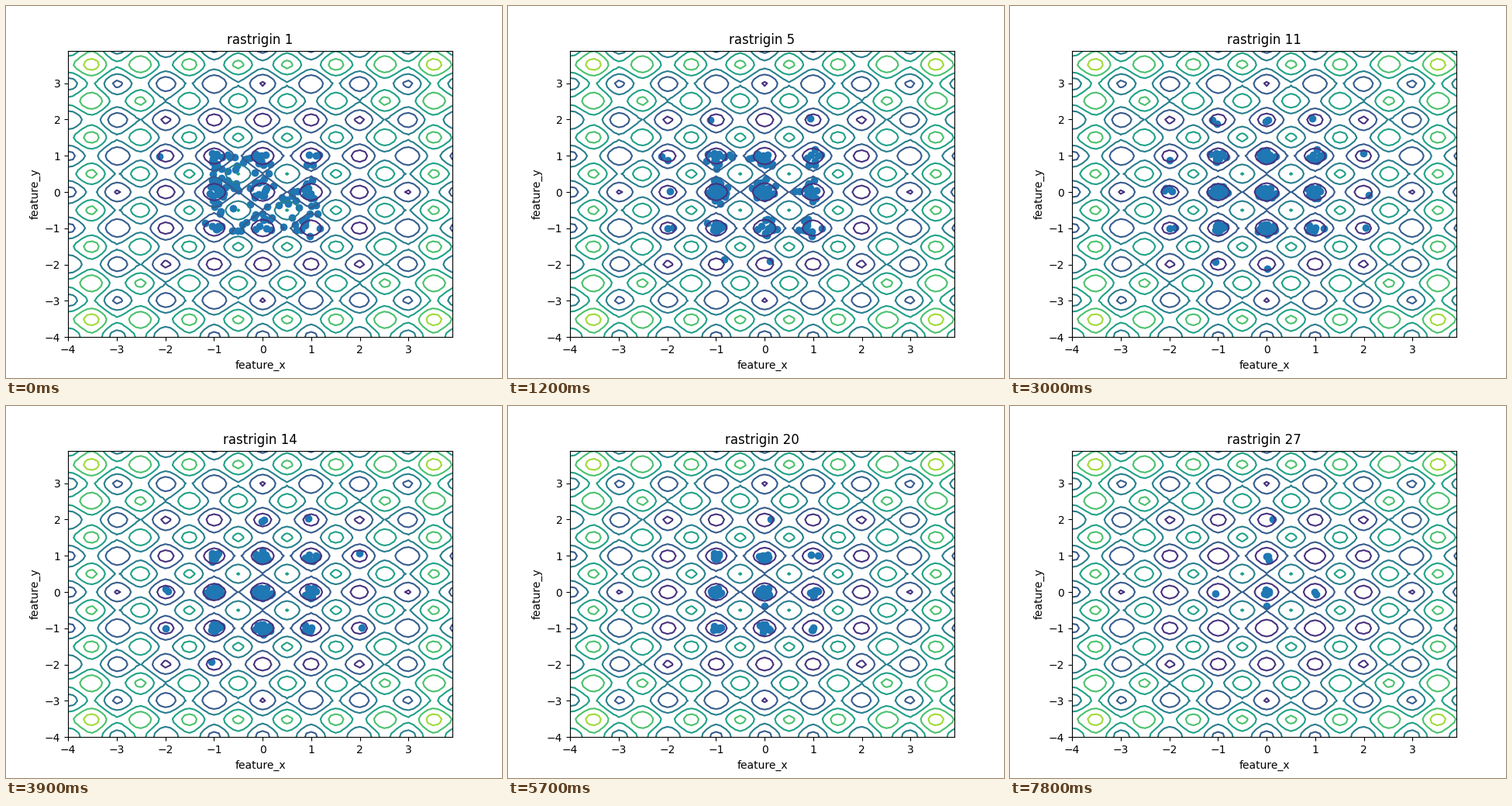
A matplotlib script for the animation above (8 s loop, 640 by 480 pixels).

```python
import itertools

import numpy as np
import matplotlib.pyplot as plt
from matplotlib.animation import FuncAnimation

FRAME_MS = 100
FRAMES_PER_GENERATION = 3
TOTAL_FRAMES = 80
rng = np.random.default_rng(7)


def rastrigin(x, y):
    return 20 + x**2 + y**2 - 10 * (np.cos(2 * np.pi * x) + np.cos(2 * np.pi * y))


def make_founders(count):
    """Scatter the first generation, denser to the left, drawn towards minima."""
    x = -1.05 + 2.3 * rng.random(count) ** 1.5
    y = rng.uniform(-1.15, 1.15, count)
    points = np.column_stack([x, y])
    return points - .06 * np.sin(2 * np.pi * points)


def make_offspring():
    """Cluster children around each minimum, fewer away from the origin."""
    clusters = []
    for cx, cy in itertools.product(range(-2, 3), repeat=2):
        count = round(36 * np.exp(-.7 * (cx**2 + cy**2) - .35 * cx))
        clusters.append((cx, cy) + rng.normal(0, .1, (count, 2)))
    return np.vstack(clusters)


founders, offspring = make_founders(130), make_offspring()
crowd = np.vstack([founders, offspring])
births = np.concatenate([
    np.ones(len(founders)), rng.integers(1, 12, len(offspring))
])
fitness = rastrigin(*crowd.T)

# Individuals that last to the end: x, y, first generation
survivors = np.array([
    (-.01, -.38, 18), (.13, 2.02, 18), (-1.05, -.04, 6),
    (.99, 0, 2), (1.01, -.07, 9), (.03, .98, 9), (.04, .88, 11),
])


def population(generation):
    limit = np.interp(generation, [1, 5, 8, 16, 27], [60, 18, 9.5, 5.6, 1.05])
    alive = (births <= generation) & (fitness < limit)
    present = survivors[:, 2] <= generation
    return np.vstack([crowd[alive], survivors[present, :2]])


fig, ax = plt.subplots(figsize=(6.4, 4.8), dpi=100)
axis = np.arange(-40, 40) / 10
X, Y = np.meshgrid(axis, axis)
ax.contour(X, Y, rastrigin(X, Y))
dots = ax.scatter([], [], color="tab:blue")
ax.set(xlim=(axis[0], axis[-1]), ylim=(axis[0], axis[-1]),
       xlabel="feature_x", ylabel="feature_y")
title = ax.set_title("rastrigin 1")


def update(frame):
    generation = frame // FRAMES_PER_GENERATION + 1
    dots.set_offsets(population(generation))
    title.set_text(f"rastrigin {generation}")
    return dots, title


anim = FuncAnimation(fig, update, frames=TOTAL_FRAMES, interval=FRAME_MS,
                     repeat=True, repeat_delay=0)
plt.show()
```
